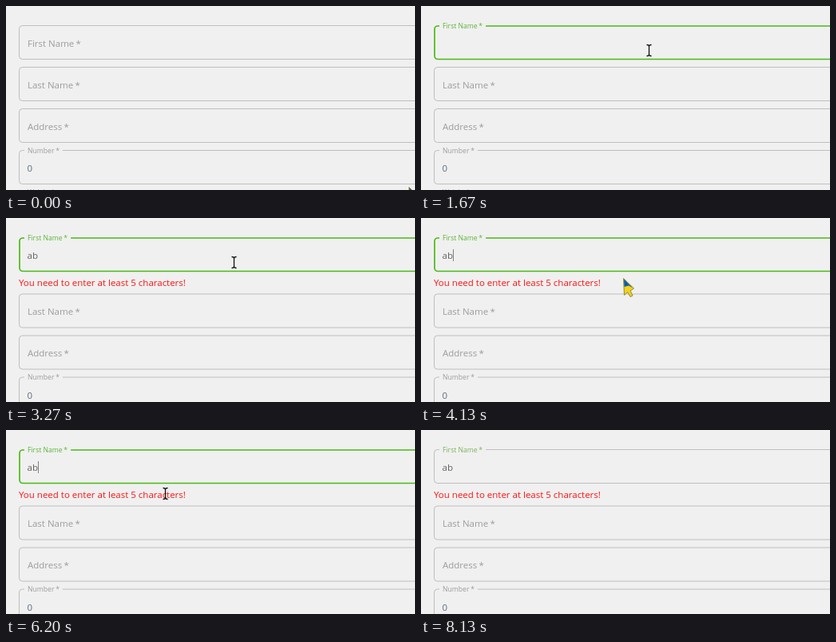
Animation, 512 px wide and 230 px high, one loop 8.19 s. Source, as an HTML page with a canvas:

```html
<!DOCTYPE html>
<html lang="en">
<head>
<meta charset="utf-8">
<title>Form validation</title>
<style>
html, body { margin: 0; width: 100%; height: 100%; overflow: hidden; background: #f0f0f0; }
canvas { display: block; }
</style>
</head>
<body>
<canvas id="stage" width="512" height="230"></canvas>
<script>
const ctx = document.getElementById('stage').getContext('2d');
const LOOP = 8190, TICK = 1000 / 15;
const BG = '#f0f0f0', GREEN = '#4aba14', GRAY = '#9c9c9c', LINE = '#bebebe', HOVER = '#808080';
const FONT = '"Open Sans", "Noto Sans", sans-serif';
const LEFT = 16.5, PAD = 27, HEIGHT = 42, PITCH = 52, SHIFT = 18.5, SIZE = 11.5;
const NAMES = ['First Name', 'Last Name', 'Address', 'Number', 'Weight'];
const ERROR = 'You need to enter at least 5 characters!';

// event times, in ticks
const FOCUS = 18, TYPE_A = 33, TYPE_B = 47, BLUR = 122, BLINK = 8;

// pointer moves: start tick, end tick, target
const START = { x: 504, y: 226 };
const MOVES = [
  [0, 3, 289, 63], [6, 10, 285.5, 55.5], [57, 62, 253, 75], [66, 68, 228, 75],
  [89, 93, 199.5, 79.5], [97, 102, 138, 131], [105, 110, 50, 262]
];

const clamp = u => Math.min(1, Math.max(0, u));

function pointer(n) {
  let { x, y } = START;
  for (const [from, to, tx, ty] of MOVES) {
    const u = clamp((n - from) / (to - from));
    x += (tx - x) * u;
    y += (ty - y) * u;
  }
  return { x, y };
}

const fieldTop = (i, n) => 24.5 + i * PITCH + (i && n >= TYPE_A ? SHIFT : 0);

const fieldAt = (p, n) => NAMES.findIndex((_, i) => {
  const dy = p.y - fieldTop(i, n);
  return p.x >= LEFT && dy >= 0 && dy <= HEIGHT;
});

// the blink phase restarts with the last key
function caretOn(n) {
  const phase = n - (n < TYPE_B ? FOCUS - 1 : TYPE_A + BLINK);
  return n >= FOCUS && n < BLUR - 1 && phase % (2 * BLINK) < BLINK;
}

function text(str, x, y, size, color) {
  ctx.font = `${size}px ${FONT}`;
  ctx.fillStyle = color;
  ctx.fillText(str, x, y);
  return ctx.measureText(str).width;
}

function field(name, top, raise, line, color, active) {
  const inset = active ? .5 : 0; // the thick border grows inwards
  ctx.strokeStyle = line;
  ctx.lineWidth = active ? 1.7 : 1;
  ctx.beginPath();
  ctx.roundRect(LEFT + inset, top + inset, 520, HEIGHT - inset, 4);
  ctx.stroke();

  const label = name + '\u2009*';
  if (raise > 0) {
    ctx.font = `${SIZE * .75}px ${FONT}`;
    ctx.fillStyle = BG;
    ctx.fillRect(23, top - 2, (ctx.measureText(label).width + 8) * raise, 4);
  }
  text(label, PAD, top + 26 - 22.8 * raise, SIZE * (1 - raise / 4), color);
}

function polygon(points) {
  ctx.beginPath();
  points.forEach(([x, y]) => ctx.lineTo(x, y));
  ctx.closePath();
}

function arrow(x, y) {
  ctx.save();
  ctx.translate(x, y);
  polygon([[.5, .5], [1.5, 21.5], [5.5, 17.5], [9, 23.5], [12, 22], [9, 16], [13.5, 13]]);
  ctx.fillStyle = '#f4d21c';
  ctx.fill();
  ctx.strokeStyle = '#8c8a3c';
  ctx.lineWidth = 1;
  ctx.stroke();
  polygon([[1, 1.5], [1.5, 11], [7, 9.5], [12, 12.5]]);
  ctx.fillStyle = '#0c5da8';
  ctx.fill();
  ctx.restore();
}

function beam(x, y) {
  ctx.strokeStyle = '#111';
  ctx.lineWidth = 1.3;
  ctx.beginPath();
  for (const s of [-1, 1]) {
    ctx.moveTo(x - 3, y + 7 * s);
    ctx.quadraticCurveTo(x, y + 7 * s, x, y + 5 * s);
    ctx.quadraticCurveTo(x, y + 7 * s, x + 3, y + 7 * s);
  }
  ctx.moveTo(x, y - 6);
  ctx.lineTo(x, y + 6);
  ctx.stroke();
}

function draw(n) {
  ctx.fillStyle = BG;
  ctx.fillRect(0, 0, 512, 230);

  const p = pointer(n);
  const hover = fieldAt(pointer(n - 1), n); // hover colour trails the pointer
  const raise = 1 - (1 - clamp((n - FOCUS + 1) / 4)) ** 2;

  NAMES.forEach((name, i) => {
    const first = i === 0;
    const active = first && n >= FOCUS && n < BLUR;
    const line = active ? GREEN : i === hover ? HOVER : LINE;
    const color = active ? '#5db636' : first && n >= BLUR ? '#7cb35c' : GRAY;
    field(name, fieldTop(i, n), first ? raise : i > 2 ? 1 : 0, line, color, active);
  });
  text('0', PAD - .5, fieldTop(3, n) + 26.5, SIZE, '#5a6c80');

  const value = n >= TYPE_B ? 'ab' : n >= TYPE_A ? 'a' : '';
  const width = text(value, PAD - .5, 51, SIZE, '#636363');
  if (caretOn(n)) {
    ctx.fillStyle = '#808080';
    ctx.fillRect(Math.round(PAD - .5 + width), 39, 1, 15);
  }
  if (value) text(ERROR, 16, 85, SIZE, '#fb1414');

  const overText = value && p.x < 225 && Math.abs(p.y - 81) < 8;
  const cursor = overText || fieldAt(p, n) >= 0 ? beam : arrow;
  cursor(p.x, p.y);
}

const start = performance.now();
function tick() {
  const t = (performance.now() - start) % LOOP;
  draw(Math.floor((t + 4) / TICK));
  requestAnimationFrame(tick);
}
tick();
</script>
</body>
</html>
```
